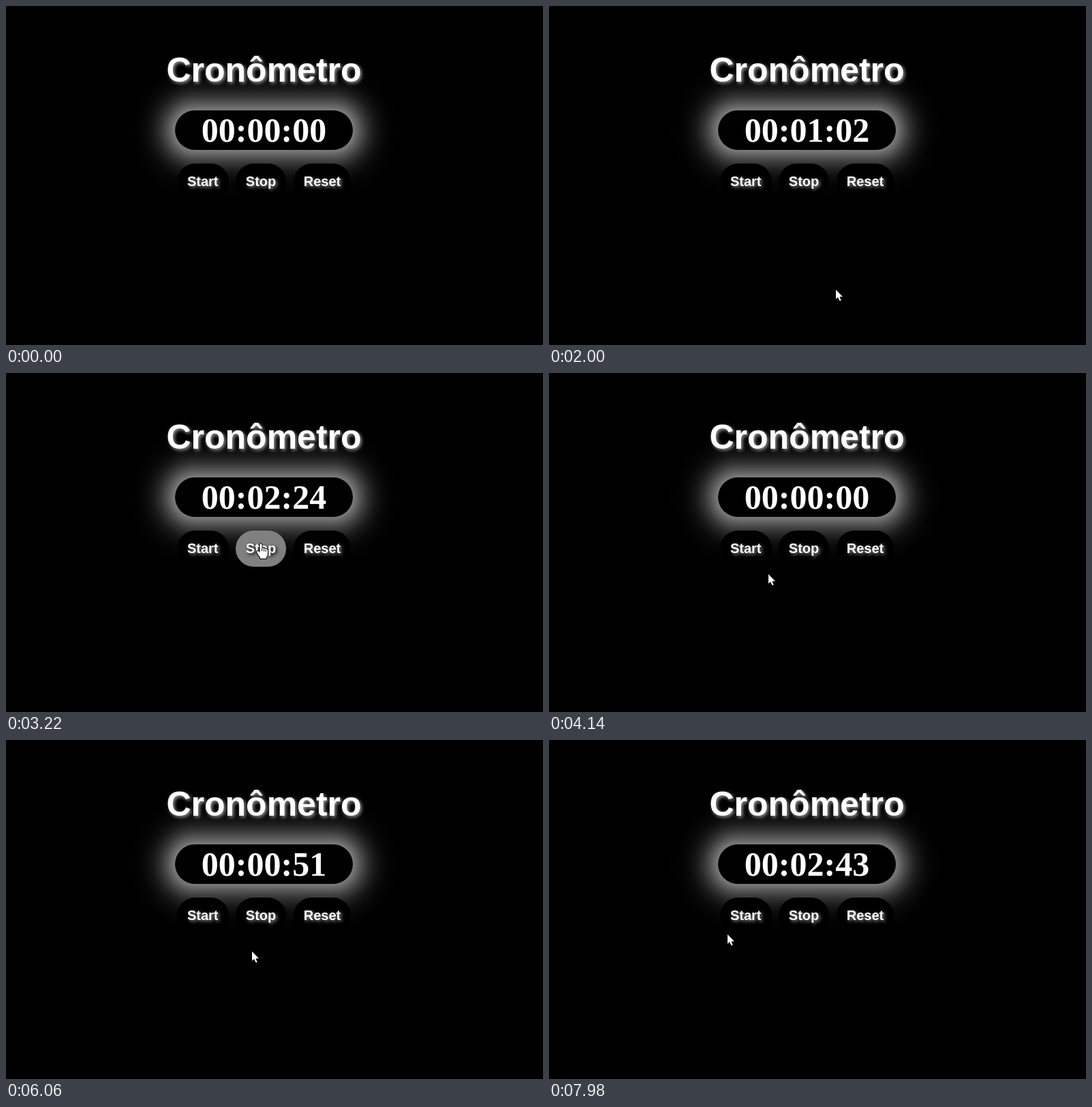
Write an HTML page that moves like this. It is 788 by 497 pixels and loops after 8 s.

```html
<!DOCTYPE html>
<html lang="pt">
<head>
<meta charset="utf-8">
<title>Cronômetro</title>
<style>
  html, body { margin: 0; width: 100%; height: 100%; overflow: hidden; background: #000; }
  #stage { position: relative; width: 788px; height: 497px; overflow: hidden; color: #fff; background: #000; }
  #stage > * { position: absolute; box-sizing: border-box; white-space: nowrap; text-align: center; }
  h1, .button { text-shadow: 2px 2px 5px #999; }
  h1 {
    margin: 0; left: 228.5px; top: 65px; width: 300px;
    font: bold 50px/58px "Liberation Sans", Arial, sans-serif;
  }
  #clock {
    left: 248px; top: 153px; width: 261px; height: 58px; border-radius: 29px;
    font: bold 50px/58px "Liberation Serif", "Times New Roman", serif;
    background: #000;
  }
  .button {
    top: 231px; height: 53px; border-radius: 26.5px;
    font: bold 20px/52px "Liberation Sans", Arial, sans-serif;
    background: #000;
  }
  .button.hover { background: #808080; text-shadow: 2px 2px 5px #000; }
  svg { left: 0; top: 0; }
  #arrow, #hand path:first-child { fill: #fff; stroke: #000; stroke-width: 2; paint-order: stroke; }
  #hand path + path { fill: none; stroke: #000; }
</style>
</head>
<body>
<div id="stage">
  <div id="clock">00:00:00</div>
  <h1>Cronômetro</h1>
  <svg width="788" height="497">
    <g id="cursor">
      <path id="arrow" d="M0 0V13.7L3 10.9L5.4 16H7.7L5.5 10.2H10Z"/>
      <g id="hand">
        <path d="M-1.5 1.5Q0-1 1.5 1.5V7Q3 5.8 4.5 7.5Q6 6.5 7.2 8.2Q9.5 7.5 10 10V15Q10 18 8 20V22H-1V20Q-4 17-6 12.5Q-5.5 10-3 11.5L-1.5 13.5Z"/>
        <path d="M1.5 7V11M4.5 8V11.5M7.2 9V12"/>
      </g>
    </g>
  </svg>
</div>
<script>
const LOOP = 8000;
const stage = document.getElementById('stage');
const clock = document.getElementById('clock');
const cursor = document.getElementById('cursor');
const arrow = document.getElementById('arrow');
const hand = document.getElementById('hand');

// Glow that fades evenly all round: one ring per pixel on a Gaussian edge.
const cdf = z => 1 / (1 + Math.exp(-1.5976 * z - 0.0706 * z ** 3));
const glow = d => Math.round(255 * (cdf((d + 58) / 25) - cdf(d / 25)));
clock.style.boxShadow = Array.from({ length: 70 }, (_, i) => {
  const v = glow(i + 0.5);
  return `0 0 0 ${i + 1}px rgb(${v},${v},${v})`;
}).join();

const buttons = [['Start', 251, 75.5], ['Stop', 336.8, 74.5], ['Reset', 421.8, 84.5]].map(([text, x, w]) => {
  const el = document.createElement('div');
  el.className = 'button';
  el.textContent = text;
  el.style.left = x + 'px';
  el.style.width = w + 'px';
  stage.insertBefore(el, stage.lastElementChild);
  return { el, x, w };
});

const spots = {
  start: { x: 290, y: 262, button: true },
  stop: { x: 374, y: 250, button: true },
  reset: { x: 470, y: 266, button: true },
  centre: { x: 363, y: 329 },
  right: { x: 694, y: 300 },
  low: { x: 421, y: 416 },
  under: { x: 362, y: 308 },
  left: { x: 239, y: 290 },
  corner: { x: 262, y: 285 }
};

// Where the pointer rests, from when until when.
const APPEAR = 50;
const visits = [
  ['centre', APPEAR, 210], ['right', 510, 510], ['start', 930, 1130], ['low', 1800, 2700],
  ['stop', 3150, 3270], ['reset', 3640, 3740], ['start', 4290, 4430], ['reset', 5140, 5200],
  ['start', 5490, 5590], ['under', 6100, 7080], ['left', 7800, 7800], ['corner', 7980, LOOP]
].map(([name, from, until]) => ({ ...spots[name], from, until }));

const runs = [
  { start: 980, stop: 3220, reset: 3790 },
  { start: 4300, stop: 5200, reset: 5200 },
  { start: 5550, stop: LOOP, reset: LOOP }
];

const ease = k => k * k * (3 - 2 * k);
const pad = n => String(n).padStart(2, '0');

// Glides between rests; leaving a button swings out below the row.
function pointerAt(t) {
  const next = visits.findIndex(v => t < v.until);
  const b = visits[next], a = visits[next - 1];
  if (!a || t >= b.from) return b;
  const k = ease((t - a.until) / (b.from - a.until));
  const dip = a.button ? 60 * Math.sin(Math.PI * k) : 0;
  return { x: a.x + (b.x - a.x) * k, y: a.y + (b.y - a.y) * k + dip };
}

function hundredths(t) {
  const run = runs.find(r => t >= r.start && t < r.reset);
  return run ? Math.floor((Math.min(t, run.stop) - run.start) / 10) : 0;
}

function draw(t) {
  const n = hundredths(t);
  clock.textContent = `00:${pad(Math.floor(n / 100))}:${pad(n % 100)}`;

  const shown = t >= APPEAR;
  const p = pointerAt(t);
  const x = Math.round(p.x), y = Math.round(p.y);
  let over = false;
  for (const b of buttons) {
    const hit = shown && x >= b.x && x < b.x + b.w && y >= 231 && y < 284;
    b.el.classList.toggle('hover', hit);
    over = over || hit;
  }
  cursor.style.display = shown ? '' : 'none';
  cursor.setAttribute('transform', `translate(${x} ${y})`);
  arrow.style.display = over ? 'none' : '';
  hand.style.display = over ? '' : 'none';
}

const origin = performance.now();
function tick() {
  draw(Math.round(performance.now() - origin) % LOOP);
  requestAnimationFrame(tick);
}
tick();
</script>
</body>
</html>
```
